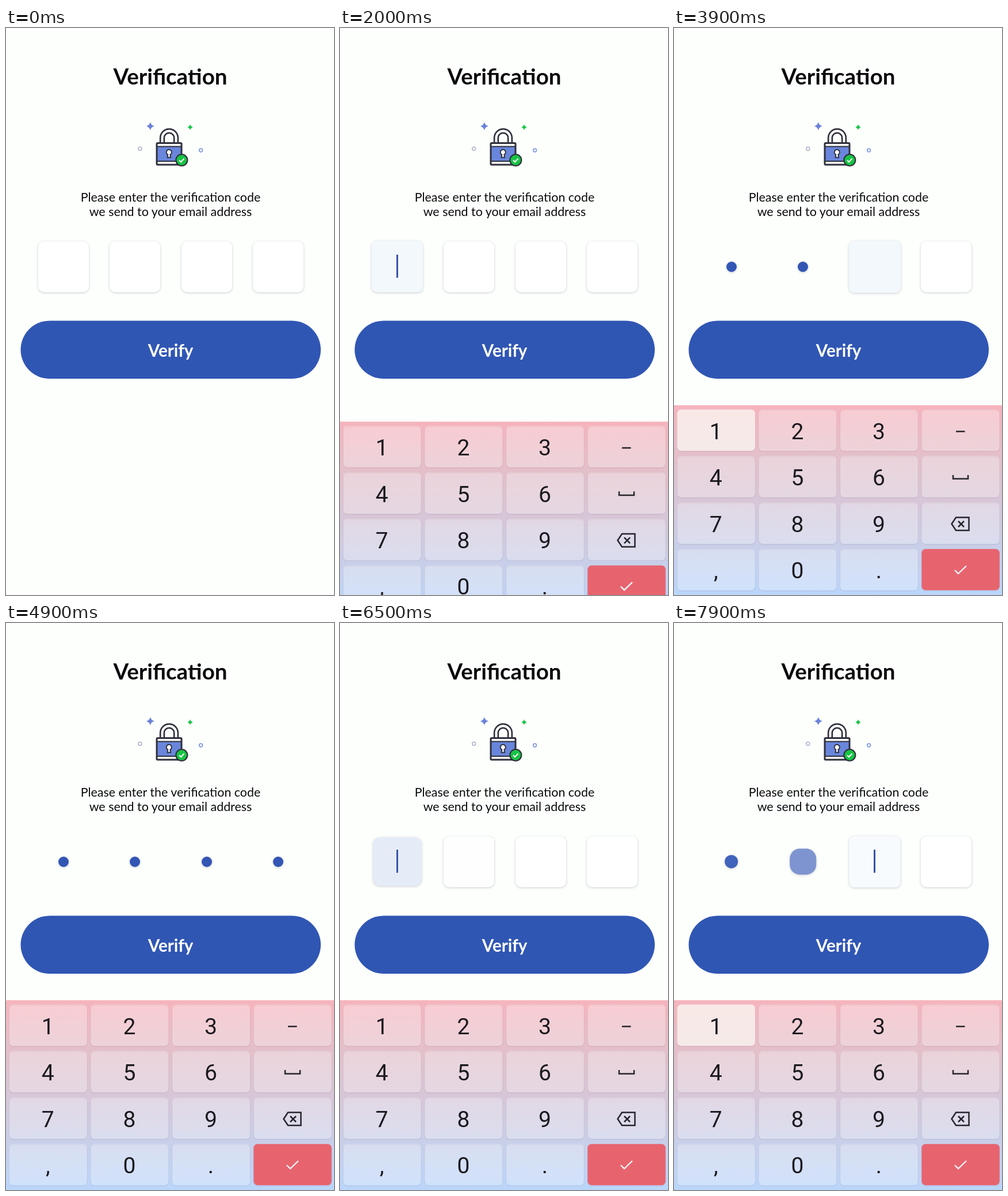
These frames come from a looping animation (570 px wide and 983 px high, 8000 ms). An HTML page:

```html
<!DOCTYPE html>
<html lang="en">
<head>
<meta charset="utf-8">
<title>Verification</title>
<style>
  html, body { margin: 0; width: 100%; height: 100%; overflow: hidden; background: #fdfffd; }
  #stage { position: absolute; inset: 0; width: 570px; height: 983px; overflow: hidden; background: #fdfffd; }
  svg { position: absolute; left: 0; top: 0; }
  text { text-anchor: middle; }
  .copy { font-family: Lato, "Open Sans", sans-serif; fill: #0a0a0c; }
  .digit { font: 39px Roboto, sans-serif; fill: #1b1a1f; }
  .box { position: absolute; top: 413.5px; transform: translate(-50%, -50%); box-shadow: 0 1px 4px rgba(40, 50, 70, .24); }
  .cursor { position: absolute; top: 393px; width: 2.5px; height: 40px; margin-left: -1.2px; background: #3953a6; opacity: 0; }
  .press { opacity: 0; }
</style>
</head>
<body>
<div id="stage">
  <svg width="570" height="983" viewBox="0 0 570 983">
    <g class="copy">
      <text x="285.5" y="98" font-size="38.5" font-weight="700">Verification</text>
      <text x="286" y="301" font-size="21.4">Please enter the verification code</text>
      <text x="286" y="325.5" font-size="21.4">we send to your email address</text>
    </g>
    <g fill="none">
      <path d="M271.5 200V190.5a12 12 0 0 1 24 0V200" stroke="#30313c" stroke-width="9.4"/>
      <path d="M271.5 200V190.5a12 12 0 0 1 24 0V200" stroke="#fff" stroke-width="4"/>
      <rect x="262" y="199.500" width="43" height="37.500" rx="1.500" fill="#6986dc"/>
      <path d="M262 199.500h43v6h-43zM262 231h43v6h-43z" fill="#fff"/>
      <path d="M262 205.500h43M262 231h43" stroke="#30313c" stroke-width="2"/>
      <rect x="262" y="199.500" width="43" height="37.500" rx="1.500" stroke="#30313c" stroke-width="3"/>
      <path d="M281.200 219.500a4.600 4.600 0 1 1 4.200 0l.6 5h-5.400z" fill="#fff" stroke="#30313c" stroke-width="2"/>
      <circle cx="305.300" cy="229" r="10" fill="#17c443" stroke="#30313c" stroke-width="2.200"/>
      <path d="M301 229.300l3 3 5.500-5.800" stroke="#fff" stroke-width="2"/>
      <path d="M250.800 163q1.500 5.800 7 7.200-5.500 1.400-7 7.200-1.500-5.800-7-7.200 5.500-1.400 7-7.200z" fill="#6c82da"/>
      <path d="M320 167q1 4 5 5-4 1-5 5-1-4-5-5 4-1 5-5z" fill="#17c443"/>
      <circle cx="232.800" cy="209.300" r="3" stroke="#b5b9cf" stroke-width="1.700"/>
      <circle cx="338.600" cy="212" r="2.800" stroke="#829ae2" stroke-width="1.700"/>
    </g>
    <rect x="25.500" y="507.500" width="521.500" height="100.500" rx="50.200" fill="#3056b4"/>
    <text class="copy" x="286" y="569.500" font-size="29.5" font-weight="700" style="fill:#fff">Verify</text>
  </svg>
  <div id="code"></div>
  <svg id="keyboard" width="570" height="983" viewBox="0 0 570 983">
    <defs>
      <linearGradient id="sky" x2="0" y2="1">
        <stop stop-color="#f6b4bd"/>
        <stop offset=".25" stop-color="#e4bfc9"/>
        <stop offset=".5" stop-color="#d7c6d7"/>
        <stop offset=".75" stop-color="#c8cfe9"/>
        <stop offset="1" stop-color="#bad6fb"/>
      </linearGradient>
    </defs>
    <rect y="654" width="570" height="329" fill="url(#sky)"/>
    <g id="keys"></g>
    <g fill="none" stroke="#26252b" stroke-width="2.500">
      <path d="M490 699.500h15.500M485 775v6.500h26V775"/>
      <path d="M490 848.500h22.500v22.500H490l-7.500-11.200zM494 855l10 10m0-10l-10 10"/>
      <path d="M488 940l6 6 14-13.500" stroke="#fff" stroke-width="2.200"/>
    </g>
  </svg>
</div>
<script>
const LOOP = 8000, MORPH = 300;
const $ = id => document.getElementById(id);

// steps: [time, state, transition length]; each state is held until the next step
function track(el, first, steps) {
  const frames = [{ ...first, offset: 0 }];
  let state = first;
  steps.forEach(([time, next, length = 0], i) => {
    const limit = i + 1 < steps.length ? steps[i + 1][0] : LOOP;
    frames.push({ ...state, offset: time / LOOP, easing: 'ease' });
    frames.push({ ...next, offset: Math.min(time + length, limit) / LOOP });
    state = next;
  });
  frames.push({ ...state, offset: 1 });
  el.animate(frames, { duration: LOOP, iterations: Infinity });
}

const show = { opacity: 1 }, hide = { opacity: 0 };
const flash = (el, spans) =>
  track(el, hide, spans.flatMap(([from, to]) => [[from, show], [to, hide]]));

// a focused field blinks its cursor every half second
function blink(from, to) {
  const spans = [];
  for (let t = from; t < to; t += 1000) spans.push([t, Math.min(t + 500, to)]);
  return spans;
}

const look = (size, radius, color) => ({
  width: size + 'px', height: size + 'px', borderRadius: radius, backgroundColor: color
});
const looks = {
  idle: look(88, '10px', '#ffffff'),
  focus: look(90, '9px', '#f3f8fc'),
  dot: look(18, '50%', '#3356b5')
};

const fields = [
  [[1760, 'focus'], [2750, 'dot'], [6300, 'focus'], [7710, 'dot']],
  [[2750, 'focus'], [3300, 'dot'], [5850, 'focus'], [6300, 'idle'], [7710, 'focus'], [7846, 'dot']],
  [[3300, 'focus'], [3960, 'dot'], [5450, 'focus'], [5850, 'idle'], [7846, 'focus']],
  [[3960, 'focus'], [4500, 'dot'], [5250, 'focus'], [5450, 'idle']]
];

fields.forEach((steps, i) => {
  const add = name => {
    const el = $('code').appendChild(document.createElement('div'));
    el.className = name;
    el.style.left = 99.5 + 124.5 * i + 'px';
    return el;
  };
  track(add('box'), looks.idle, steps.map(([time, name]) => [time, looks[name], MORPH]));
  flash(add('cursor'), steps.flatMap(([time, name], n) =>
    name === 'focus' ? blink(time, steps[n + 1]?.[0] ?? LOOP) : []));
});

function draw(tag, attrs, label = '') {
  const el = document.createElementNS('http://www.w3.org/2000/svg', tag);
  for (const name in attrs) el.setAttribute(name, attrs[name]);
  el.textContent = label;
  return $('keys').appendChild(el);
}

const presses = {
  '1': [[2600, 2750], [3180, 3300], [3860, 3960], [4400, 4500], [7610, 7710], [7750, 7846], [7875, 8000]],
  'back': [[5180, 5250], [5370, 5450], [5730, 5850], [6200, 6300]]
};
const rows = [['1', '2', '3', 'dash'], ['4', '5', '6', 'space'], ['7', '8', '9', 'back'], [',', '0', '.', 'enter']];

rows.forEach((row, r) => row.forEach((key, c) => {
  const x = 5.5 + 141.6 * c, y = 661.5 + 80.6 * r;
  const shape = { x, y, width: 135.5, height: 71.5, rx: 7 };
  draw('rect', { ...shape, y: y + 1.3, fill: 'none', stroke: '#806878', 'stroke-opacity': .16 });
  draw('rect', key === 'enter' ? { ...shape, fill: '#e7646f' } : { ...shape, fill: '#fff', 'fill-opacity': .31 });
  if (presses[key])
    flash(draw('rect', { ...shape, class: 'press', fill: '#f8f2ee', 'fill-opacity': .75 }), presses[key]);
  if (key.length === 1)
    draw('text', { class: 'digit', x: x + 67.3, y: 713 + 80.3 * r }, key);
}));

track($('keyboard'), { transform: 'translateY(330px)' }, [[1820, { transform: 'translateY(0px)' }, 280]]);
</script>
</body>
</html>
```
